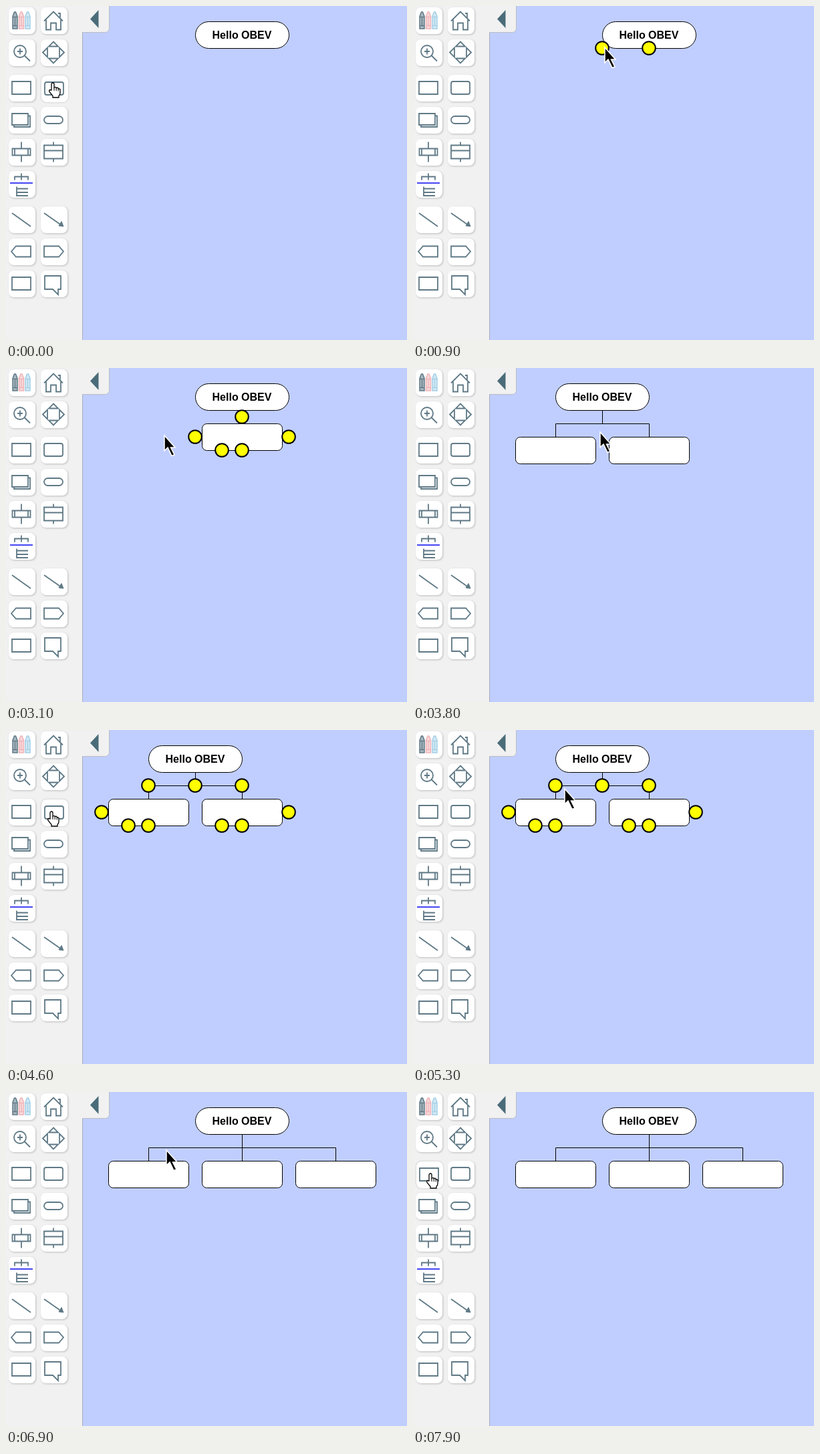
Recreate the animation shown at these times as an HTML page with a canvas. Size 600 by 500 pixels, loop 8 s.

```html
<!DOCTYPE html>
<html lang="en">
<head>
<meta charset="utf-8">
<title>Diagram editor</title>
<style>
  html, body { margin: 0; width: 600px; height: 500px; overflow: hidden; }
  canvas { display: block; }
</style>
</head>
<body>
<canvas id="stage" width="600" height="500"></canvas>
<script>
const ctx = document.getElementById('stage').getContext('2d');
const LOOP = 8000, STEP = 100, SIZE = 40, PITCH = 48;
const INK = '#5f7986', PANEL = '#f1f1f1';

// Path helpers
const path = d => new Path2D(d);

function box(w, h, r = 0, x = 0, y = 0) {
  const p = new Path2D();
  p.roundRect(x - w / 2, y - h / 2, w, h, r);
  return p;
}

function disc(r, x = 0, y = 0) {
  const p = new Path2D();
  p.arc(x, y, r, 0, 2 * Math.PI);
  return p;
}

function join(...parts) {
  const p = new Path2D();
  for (const part of parts) p.addPath(part);
  return p;
}

function turned(part, angle) {
  const p = new Path2D();
  p.addPath(part, new DOMMatrix().rotate(angle));
  return p;
}

function paint(shape, fill, stroke, width = 1) {
  ctx.lineWidth = width;
  ctx.strokeStyle = stroke;
  ctx.fillStyle = fill;
  if (fill) ctx.fill(shape);
  ctx.stroke(shape);
}

// Toolbar icons around their own centre, two per row
const tag = path('M-15 0L-8-8H14V8H-8Z');
const triangle = path('M0-16L7-9H-7Z');
const ICONS = [
  new Path2D(),
  path('M-14 1L0-13L14 1M-11-1V14H-4V4H4V14H11V-1M7-10.5H10V-4'),
  join(disc(9, -2, -1.5), path('M5 5L13 13M-2-6V3M-6-1.5H2')),
  join(...[0, 90, 180, 270].map(a => turned(triangle, a))),
  box(28, 19),
  box(28, 19, 3),
  join(box(24, 17, 0, -2, -1), path('M10-6H13V10.5H-11V7.5')),
  box(28, 11, 5.5),
  join(box(27, 10), path('M-10-5V5M10-5V5M0-15V-5M0 5V15')),
  join(box(28, 20), path('M-14-2H14M0-15V-10M0 10V15')),
  path('M0-16V-6M-10-6V-11H10V-6M-7 4V17.5H10M-7 7H10M-7 12.5H10'),
  null,
  path('M-14-9.5L14 10.5'),
  path('M-14-9.5L11 8'),
  tag,
  turned(tag, 180),
  box(28, 19),
  path('M-13-11.5H11V8.5H7V16.5L-1 8.5H-13Z')
];

const ARROW = path('M0 0V23L5 18L11 30.5L15 29L9.5 18H16Z');
const HAND = path('M-2 11V2A2 2 0 0 1 2 2V9V7.5A1.7 1.7 0 0 1 5.2 7.5V9.5V8.2' +
  'A1.6 1.6 0 0 1 8.2 8.2V10.5V9.8A1.5 1.5 0 0 1 11 9.8V15Q11 18 9 19.5V22H0V19.5L-5 13.5Q-6 10.5 -4 10.5Z');

// Pointer rests: arrival, departure, x, y
const RESTS = [
  [0, 300, 70, 115], [900, 900, 287, 62], [1200, 1600, 350, 62],
  [2200, 2600, 65, 123], [3300, 3900, 280, 96], [4400, 4700, 68, 122],
  [5200, 5300, 227, 88], [5800, 6700, 280, 80], [7500, LOOP, 26, 122]
];
const PICKED = [300, 2500, 4500]; // a tool is chosen and the handles appear
const ADDED = [1500, 3700, 6300]; // a handle is clicked and a box is added

function pointer(t) {
  const i = RESTS.findLastIndex(r => r[0] <= Math.max(0, t));
  const [, leave, x, y] = RESTS[i];
  if (t <= leave) return [x, y];
  const [arrive, , nx, ny] = RESTS[i + 1];
  const u = (t - leave) / (arrive - leave), e = u * u * (3 - 2 * u);
  return [Math.round(x + (nx - x) * e), Math.round(y + (ny - y) * e)];
}

function corner(index) {
  const row = index >> 1;
  return [4 + PITCH * (index % 2), 2 + PITCH * row + 5 * (row > 1) + 5 * (row > 5)];
}

function buttonAt(px, py) {
  return ICONS.findIndex((icon, i) => {
    const [x, y] = corner(i);
    return icon && px >= x && px < x + SIZE && py >= y && py < y + SIZE;
  });
}

function pencils() {
  const shades = [[INK, '#aab8bf'], ['#f0b4b8', '#f8d9db'], ['#a4cfe6', '#d3eaf5']];
  shades.forEach(([line, fill], i) => {
    ctx.save();
    ctx.translate((i - 1) * 9.5, 0);
    paint(path('M-3.5-6L-1-12.5H1L3.5-6V12.5H-3.5Z'), fill, line, 1.5);
    paint(path('M-3.5-5H3.5M-3.5 8H3.5M0-4V8'), null, line, 1.3);
    ctx.restore();
  });
}

function button(index, pressed) {
  const [x, y] = corner(index);
  ctx.save();
  ctx.translate(x + 19 + pressed, y + 19.5 + pressed);
  ctx.save();
  ctx.shadowColor = 'rgba(0,0,0,.22)';
  ctx.shadowBlur = 3;
  ctx.shadowOffsetX = ctx.shadowOffsetY = pressed ? 0 : 1;
  ctx.fillStyle = '#fff';
  ctx.fill(box(SIZE, SIZE, 8, 1, .5));
  ctx.restore();
  paint(ICONS[index], null, INK, 1.8);
  if (index === 0) pencils();
  if (index === 10) paint(path('M-17-1.5H17'), null, '#4646f4', 1.8);
  if (index === 13) paint(path('M15 10.5L8 9.5L12 3Z'), INK, INK);
  ctx.restore();
}

function panel(hovered) {
  ctx.fillStyle = '#c0ceff';
  ctx.fillRect(0, 0, 600, 500);
  paint(box(100, 80, 6, 104.5, -.5), PANEL, '#b9bcc4');
  ctx.fillStyle = '#a9adba';
  ctx.fillRect(114, 40, 1, 460);
  ctx.fillStyle = PANEL;
  ctx.fillRect(0, 0, 114, 500);
  ctx.fillStyle = '#4a6c79';
  ctx.fill(path('M126 19.5L138.5 6V33Z'));
  ICONS.forEach((icon, i) => icon && button(i, i === hovered));
}

// Box centres, the root above their middle, and the handles that follow from them
function layout(count) {
  const first = count > 1 ? 213 : 353;
  const kids = Array.from({ length: count }, (_, i) => first + 140 * i);
  const last = first + 140 * Math.max(0, count - 1), root = (first + last) / 2;
  const top = count > 1 ? 103 : 83, middle = top + 20;
  const handles = count ? [
    ...[...new Set([root, ...kids])].map(x => [x, count > 1 ? 83 : 73]),
    [first - 70, middle], [last + 70, middle],
    ...kids.flatMap(x => [[x - 30, top + 40], [x, top + 40]])
  ] : [[root - 70, 63], [root, 63]];
  return { kids, first, last, root, top, middle, handles };
}

function diagram(t, tip) {
  const count = ADDED.filter(a => t >= a).length;
  const { kids, first, last, root, top, middle, handles } = layout(count);

  ctx.save();
  ctx.translate(.5, .5);
  if (count) {
    const drops = kids.map(x => `M${x} 83V${top}`).join('');
    paint(path(`M${root} 63V83M${first} 83H${last}${drops}`), null, '#000');
  }
  paint(box(140, 40, 20, root, 43), '#fff', '#000');
  for (const x of kids) paint(box(120, 40, 7, x, middle), '#fff', '#000');
  ctx.restore();

  ctx.fillStyle = '#000';
  ctx.font = 'bold 16px "Liberation Sans", Arial, sans-serif';
  ctx.textAlign = 'center';
  ctx.fillText('Hello OBEV', root, 49);

  if (!(t >= PICKED[count])) return;
  for (const [x, y] of handles) {
    const hot = Math.hypot(tip[0] - x, tip[1] - y) < 10;
    paint(disc(9.8, x, y), hot ? '#000' : '#ff0', hot ? '#ff0' : '#000', 2);
  }
}

function draw(t) {
  const [x, y] = pointer(t), hovered = buttonAt(x, y);
  panel(hovered);
  diagram(t, pointer(t - STEP)); // hover reacts one step late
  ctx.save();
  ctx.translate(x, y);
  if (hovered < 0) {
    paint(ARROW, '#000', '#fff', 1.5);
  } else {
    paint(HAND, '#fff', '#000', 1.3);
    paint(path('M2 9V12M5.2 9.5V12M8.2 10.5V12.5'), null, '#000');
  }
  ctx.restore();
}

const start = performance.now();
function tick() {
  const t = (performance.now() - start) % LOOP;
  draw(Math.floor(t / STEP) * STEP);
  requestAnimationFrame(tick);
}
tick();
</script>
</body>
</html>
```
